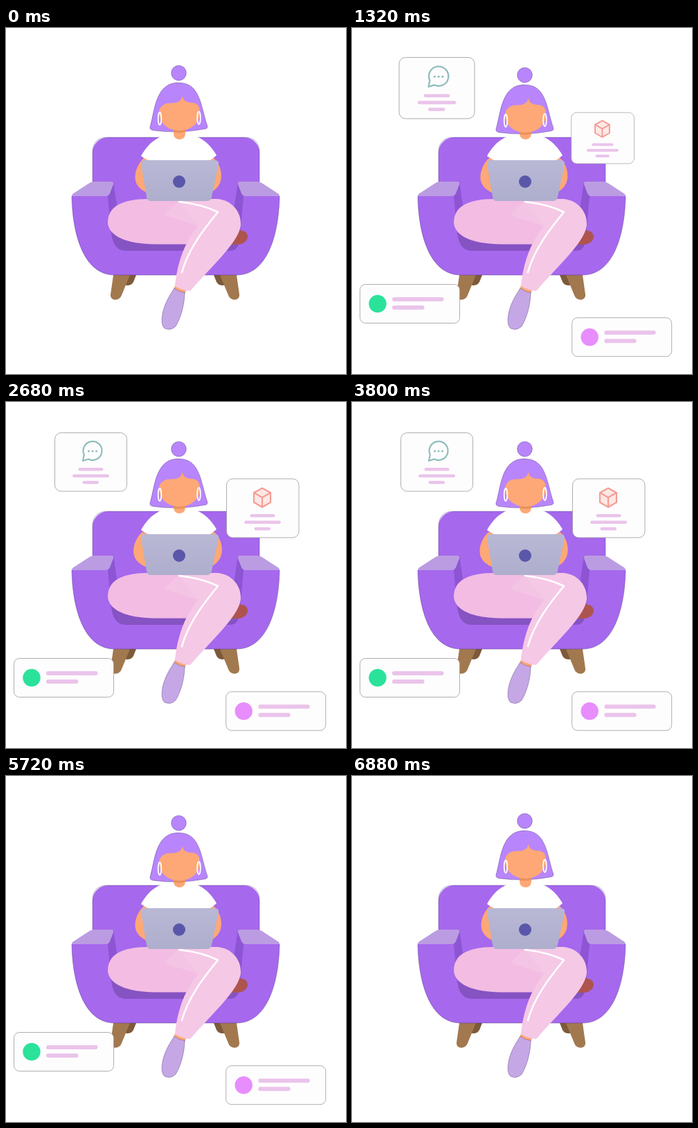
An HTML page for the animation above (6.96 s loop, 491 by 500 pixels).

```html
<!DOCTYPE html>
<html lang="en">
<head>
<meta charset="utf-8">
<title>Working from the armchair</title>
<style>
  html, body { margin: 0; width: 100%; height: 100%; overflow: hidden; background: #fff; }
  svg { display: block; width: 100%; height: 100%; }
  .card { fill: #fefdfe; stroke: #9d999f; stroke-width: .8; }
  .bar { fill: #eac4ea; }
  .skin { fill: #fda876; }
  .edge { stroke: #4d3678; stroke-opacity: .6; stroke-width: .7; }
</style>
</head>
<body>
<svg viewBox="0 0 491 500" xmlns="http://www.w3.org/2000/svg">
  <defs>
    <linearGradient id="metal" x1="0" y1="0" x2="0" y2="1">
      <stop offset="0" stop-color="#b9b8d5"/>
      <stop offset="1" stop-color="#aeaecd"/>
    </linearGradient>
    <g id="side">
      <path fill="#7d5a3a" d="M168 357H188L184 367Q180 374 171 371Z"/>
      <path fill="#a2784f" d="M155 357H179L167 386C164 395 150 395 151 385Z"/>
    </g>
    <g id="arm">
      <path fill="#8d55d3" d="M147 243L155 222L161 262L152 300Z"/>
      <path fill="#bb9ce2" d="M95 243Q95 240 99 238L119 225Q123 222 127 222H152Q156 222 155 226L150 239Q148 243 144 243Z"/>
    </g>
  </defs>

  <use href="#side"/>
  <use href="#side" transform="matrix(-1 0 0 1 488 0)"/>
  <rect x="125" y="158" width="241" height="180" rx="22" fill="#a668ed"/>
  <path fill="#a668ed" d="M95 243H148L156 290H334L342 243H395C394 300 377 357 333 357H157C113 357 96 300 95 243Z"/>
  <path class="edge" fill="none" d="M125 222V180Q125 158 147 158H344Q366 158 366 180V222M395 243C394 300 377 357 333 357H157C113 357 96 300 95 243"/>
  <path fill="#8653c3" d="M152 292H336V312Q334 322 322 322H172Q153 321 152 292Z"/>
  <use href="#arm"/>
  <use href="#arm" transform="matrix(-1 0 0 1 490 0)"/>

  <path fill="#ad544f" d="M322 313L334 292Q349 292 349 302Q348 311 336 313Z"/>
  <path class="skin" d="M245 370L261 376L258 385L241 380Z"/>
  <path class="edge" fill="#c5a7e6" d="M243 376Q250 382 258 382C258 400 252 420 245 431Q238 438 229 434Q223 429 226 413C229 398 236 387 243 376Z"/>
  <path fill="#f3bce3" d="M206 247C166 247 147 259 147 281C148 301 174 312 215 312.500H270L300 250Z"/>
  <path fill="#f5c8e6" d="M230 247H305C327 249 340 266 339 285C336 309 303 338 266 380Q253 379 244 373C247 343 256 312 277 286L228 270L250 250Z"/>
  <path fill="#f0b3de" d="M250 251L228 270L277 286Z" opacity=".2"/>
  <path fill="none" stroke="#fff" stroke-width="2.600" stroke-linecap="round" stroke-linejoin="round" d="M250 251Q284 255 306 266C286 290 263 320 254 353"/>

  <path id="armL" class="skin" d="M199 188C188 198 184 214 188 224Q193 235 207 239V190Z"/>
  <path id="armR" class="skin" d="M300 188C311 198 313 214 309 224Q304 235 292 239V190Z"/>
  <path fill="#fff" d="M243 153C221 154 206 165 195 185Q203 191 211 193H291Q298 190 304 184C294 167 281 155 259 153Z"/>
  <path class="skin" d="M242 140H259V153Q258 161 250.500 161Q243 161 242 153Z"/>
  <g id="head">
    <circle class="edge" cx="249.500" cy="65" r="10.800" fill="#b985fc"/>
    <path class="edge" fill="#b985fc" d="M208 143C215 121 215 79 249 79C281 79 281 113 291 142Q291 146 286 146Q250 153 213 148Q207 147 208 143Z"/>
    <path fill="#e8935f" d="M240 144H261L259 150Q250 153 242 150Z"/>
    <path class="skin" d="M254.500 98C256 106 262 108 270 108C278 109 281 116 280 125C278 139 266 148 250.500 148C235 148 223 139 221 125C220 115 227 108 238 108.500C248 109 254 105 254.500 98Z"/>
    <g fill="none" stroke="#fff" stroke-width="1.800">
      <ellipse cx="222" cy="131" rx="2.300" ry="9"/>
      <ellipse cx="278.500" cy="130" rx="2.300" ry="9"/>
    </g>
  </g>
  <path fill="url(#metal)" d="M201 191H301Q308 191 307 197L297 244Q296 250 290 250H209Q204 250 203 244L195 197Q194 191 201 191Z"/>
  <circle cx="250" cy="222" r="9" fill="#5a57ab"/>

  <g id="note1"></g>
  <g id="note2"></g>
  <g id="chat">
    <rect class="card" x="70.500" y="44.500" width="104" height="84.500" rx="9"/>
    <path fill="none" stroke="#8fbebb" stroke-width="2.200" stroke-linejoin="round" d="M111 85L112.800 76.200A13.500 13.500 0 1 1 118.900 82.500Z"/>
    <g fill="#8fbebb"><circle cx="119.500" cy="71" r="1.500"/><circle cx="125" cy="71" r="1.500"/><circle cx="130.500" cy="71" r="1.500"/></g>
    <g class="bars"></g>
  </g>
  <g id="box">
    <rect class="card" x="318.500" y="111" width="104.500" height="85" rx="9"/>
    <g fill="#fde8e5" stroke="#f49d95" stroke-width="2.200" stroke-linejoin="round">
      <path d="M370 124.500L382 131V145L370 152L358 145V131Z"/>
      <path fill="none" d="M358 131L370 138L382 131M370 138V152"/>
    </g>
    <g class="bars" transform="translate(248 67)"></g>
  </g>
</svg>
<script>
const LOOP = 6960, STEP = 40, END = 2840, BACK_END = 6880, BACK = 3120;
const $ = id => document.getElementById(id);
const bar = (x, y, w, h) =>
  `<rect class="bar" x="${x}" y="${y}" width="${w}" height="${h}" rx="${h / 2}"/>`;

// Value at time s on a table of [time, value], eased between entries.
function at(s, keys) {
  if (s <= keys[0][0]) return keys[0][1];
  for (let i = 1; i < keys.length; i++) {
    const [t0, a] = keys[i - 1], [t1, b] = keys[i];
    if (s < t1) return a + (b - a) * (1 - Math.cos(Math.PI * (s - t0) / (t1 - t0))) / 2;
  }
  return keys[keys.length - 1][1];
}

document.querySelectorAll('.bars').forEach(g => {
  g.innerHTML = bar(104.5, 95, 36, 4.6) + bar(96, 104.5, 53, 4.6) + bar(110.5, 114, 23.5, 4.6);
});

function makeNote(id, x, y, color, slide, long, short) {
  const g = $(id);
  g.innerHTML = `
    <clipPath id="${id}a"><rect x="47" y="17" height="10"/></clipPath>
    <clipPath id="${id}b"><rect x="47" y="29" height="10"/></clipPath>
    <rect class="card" x=".5" y=".5" width="144" height="56" rx="8"/>
    <circle cx="26" cy="28.500" r="12.700" fill="${color}"/>
    <g clip-path="url(#${id}a)">${bar(47, 19, 74.5, 6)}</g>
    <g clip-path="url(#${id}b)">${bar(47, 31, 46.5, 6)}</g>`;
  const [a, b] = g.querySelectorAll('clipPath rect');
  return s => {
    g.setAttribute('transform', `translate(${x} ${y + at(s, slide)})`);
    a.setAttribute('width', at(s, long));
    b.setAttribute('width', at(s, short));
  };
}

const notes = [
  makeNote('note1', 11, 370, '#2be29b', [[0, 132], [140, -15], [220, 0]],
    [[120, 0], [500, 75]], [[60, 0], [300, 47]]),
  makeNote('note2', 317.2, 418.2, '#e78dfd', [[240, 84], [380, -9], [460, 0]],
    [[470, 0], [920, 75]], [[400, 0], [640, 47]])
];

const HEAD = [[200, 0], [500, 6], [800, 3]];
const CHAT = [[1080, 0], [1350, 1.08], [1490, 1]];
const BOX = [[1110, 0], [1420, 1.136], [1610, .92], [1800, 1.05], [1960, 1]];

function zoom(id, x, y, k) {
  const g = $(id);
  g.style.display = k > 0 ? '' : 'none';
  g.setAttribute('transform', `translate(${x} ${y}) scale(${k}) translate(${-x} ${-y})`);
}

// Forward, pause, then the same motion backwards a little slower.
function phase(t) {
  const s = t < LOOP / 2 ? t : (BACK_END - t) * END / BACK;
  return Math.max(0, Math.min(END, s));
}

function draw(t) {
  const s = phase(t);
  const sway = 1.2 * (1 - Math.cos(2 * Math.PI * s / 1070));
  $('armL').setAttribute('transform', `translate(${-sway} 0)`);
  $('armR').setAttribute('transform', `translate(${sway * .4} 0)`);
  $('head').setAttribute('transform', `translate(0 ${at(s, HEAD)})`);
  notes.forEach(n => n(s));
  zoom('chat', 122.5, 86.5, at(s, CHAT));
  zoom('box', 305, 196, at(s, BOX));
}

const start = performance.now();
function tick() {
  const t = (performance.now() - start) % LOOP;
  draw(Math.floor(t / STEP) * STEP);
  requestAnimationFrame(tick);
}
tick();
</script>
</body>
</html>
```
